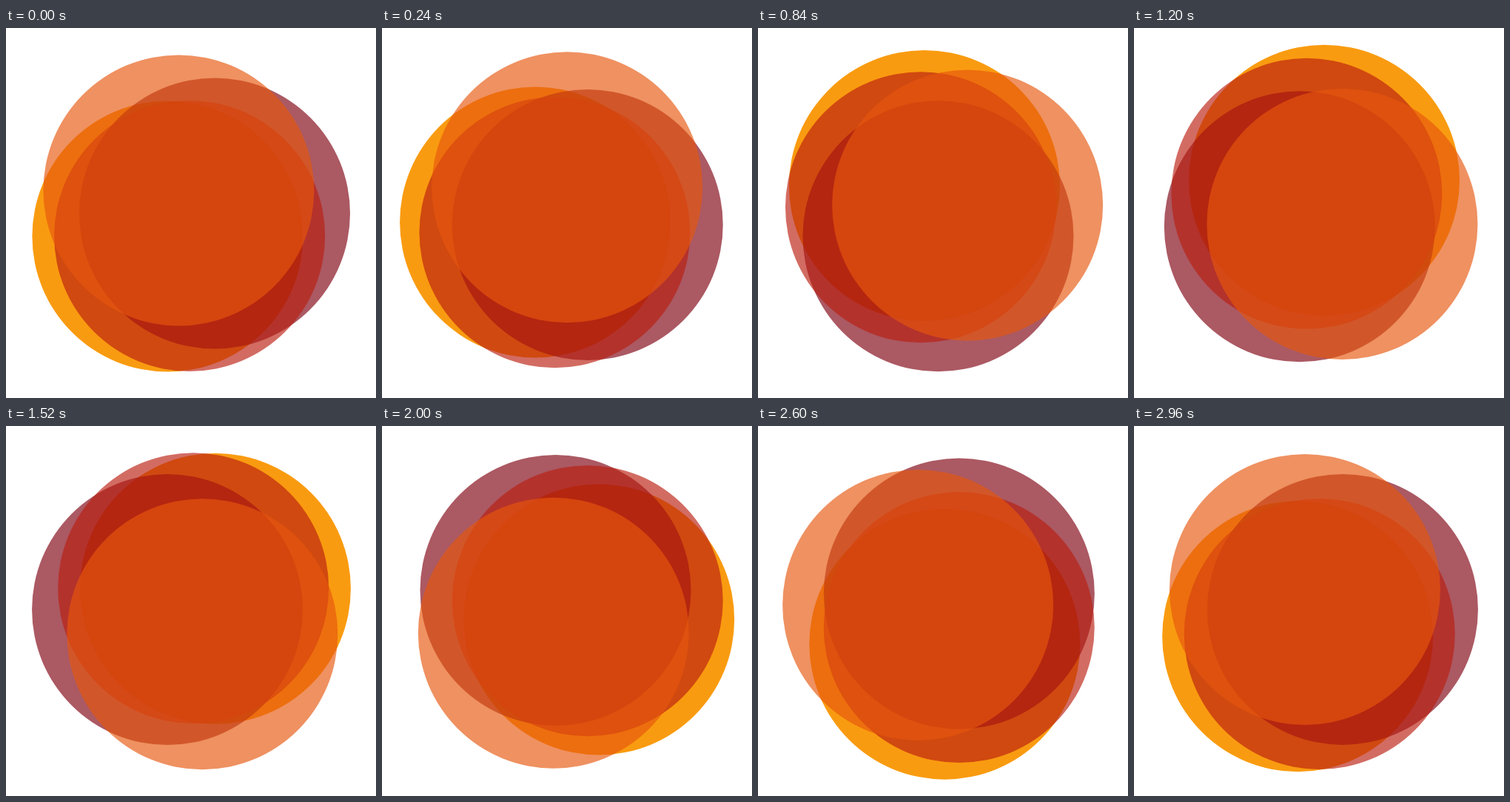
Write an HTML page that moves like this. It is 500 px wide and 500 px high and loops after 3000 ms.

```html
<!DOCTYPE html>
<html lang="en">
<head>
<meta charset="utf-8">
<title>Orbiting discs</title>
<style>
  html, body { margin: 0; width: 100%; height: 100%; overflow: hidden; background: #fff; }
  svg { display: block; width: 100%; height: 100%; }
</style>
</head>
<body>
<svg id="stage" viewBox="0 0 500 500"></svg>
<script>
const LOOP = 3000;
const STEP = 40;
const CENTER = 250;
const RADIUS = 183;

// Bottom to top; phase in degrees, clockwise from the right.
const discs = [
  { color: '#f99b10', opacity: 1, orbit: 44.7, phase: 135 },
  { color: '#7e0010', opacity: 0.65, orbit: 32, phase: 1 },
  { color: '#ba1e10', opacity: 0.65, orbit: 31, phase: 93.5 },
  { color: '#e6570d', opacity: 0.65, orbit: 34.8, phase: -118.5 }
];

const stage = document.getElementById('stage');
for (const disc of discs) {
  disc.node = document.createElementNS('http://www.w3.org/2000/svg', 'circle');
  disc.node.setAttribute('r', RADIUS);
  disc.node.setAttribute('fill', disc.color);
  disc.node.setAttribute('fill-opacity', disc.opacity);
  stage.append(disc.node);
}

function render(time) {
  const stepped = Math.floor((time % LOOP) / STEP) * STEP;
  const turn = stepped / LOOP * 360;
  for (const { node, orbit, phase } of discs) {
    const angle = (phase + turn) * Math.PI / 180;
    node.setAttribute('cx', CENTER + orbit * Math.cos(angle));
    node.setAttribute('cy', CENTER + orbit * Math.sin(angle));
  }
}

const start = performance.now();
function tick() {
  render(performance.now() - start);
  requestAnimationFrame(tick);
}
tick();
</script>
</body>
</html>
```
